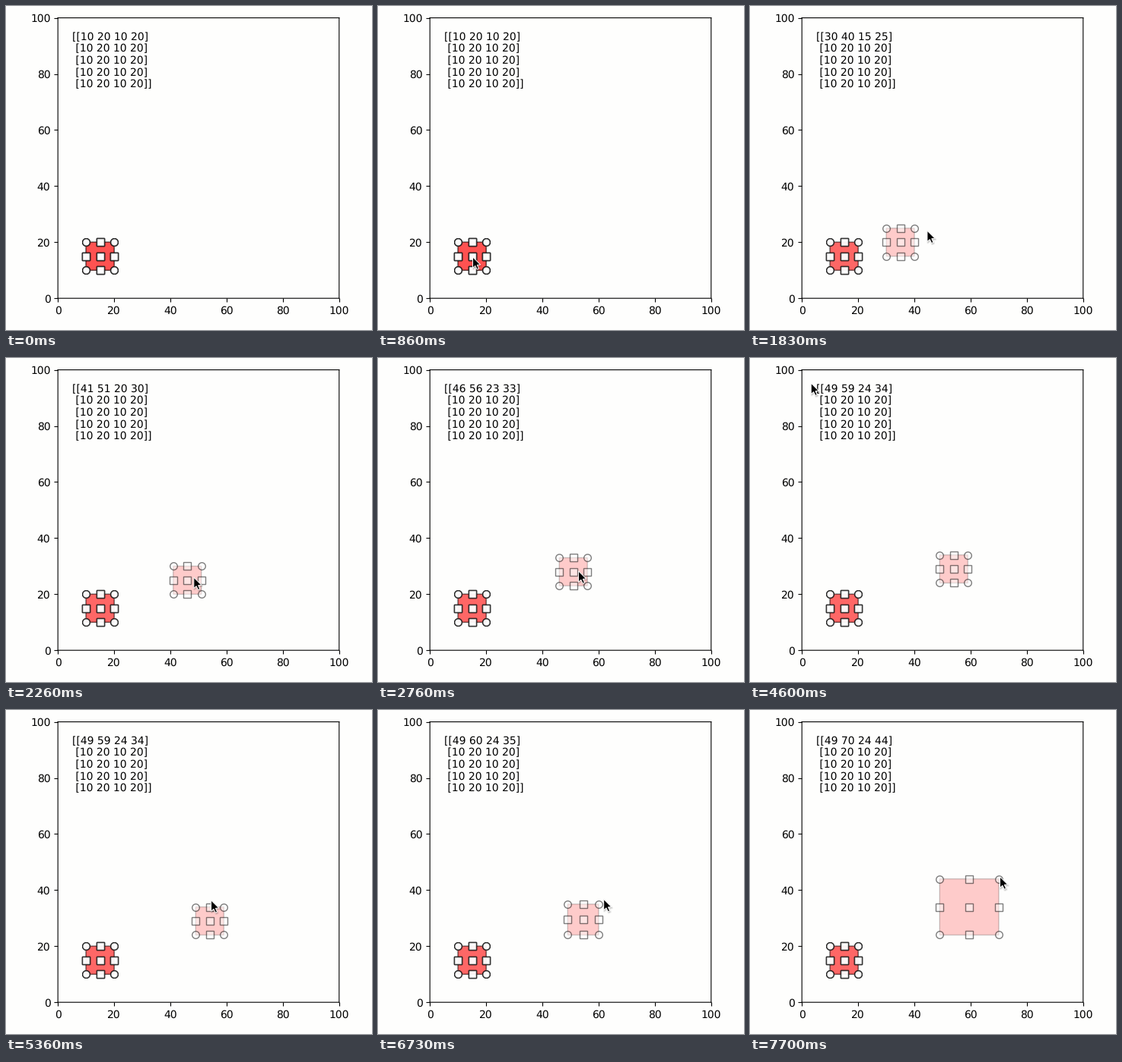
Animation of 481x427 px, one loop 8000 ms. Source, as a matplotlib script:

```python
import numpy as np
import matplotlib.pyplot as plt
from matplotlib.animation import FuncAnimation
from matplotlib.patches import Polygon, Rectangle

W, H, DPI = 481, 427, 100
INTERVAL, LOOP = 25, 8000
LEFT, TOP, SIDE = 68.2, 15.6, 369.6
UNIT = SIDE / 100  # pixels per data unit
PAPER = "#fefefd"

plt.rcParams.update({"font.family": "DejaVu Sans", "font.size": 10,
                     "text.hinting": "none", "path.snap": False})


def linear(s):
    return s


def smooth(s):
    return s * s * (3 - 2 * s)


def brake(s):
    return 1 - (1 - s) ** 2


def soft(s):
    return 1 - (1 - s) ** 1.3


# Pointer strokes: begin, end (ms), easing, bend point, stop (pixels)
ENTRY = (484, 179)
STROKES = [
    (0, 830, brake, (220, 280), (124, 330)),
    (1260, 1850, smooth, (178, 325), (233, 295)),
    (1850, 2900, linear, None, (268, 277.5)),
    (3440, 3900, smooth, None, (160, 21)),
    (3900, 4260, smooth, None, (84, 27)),
    (4300, 5100, smooth, (45, 15), (210, 132)),
    (5130, 5500, smooth, (260, 276), (298, 258)),
    (5500, 5760, smooth, None, (287, 257)),
    (6550, 7540, soft, None, (328, 219)),
]


def pointer(t):
    """Tip of the pointer, moving along quadratic curves."""
    pos = np.array(ENTRY, float)
    for begin, end, ease, bend, stop in STROKES:
        if t <= begin:
            break
        stop = np.array(stop, float)
        bend = (pos + stop) / 2 if bend is None else np.array(bend)
        u = ease(min((t - begin) / (end - begin), 1))
        pos = (1 - u) ** 2 * pos + 2 * u * (1 - u) * bend + u * u * stop
    return pos


def pull(t, begin, end, lag):
    """Whole data units the pointer has dragged, seen with a delay."""
    dx, dy = pointer(np.clip(t - lag, begin, end)) - pointer(begin)
    return round(dx / UNIT), round(-dy / UNIT)


class Selector:
    """Translucent rectangle with corner, edge and centre handles."""

    def __init__(self, ax):
        self.rect = ax.add_patch(Rectangle((0, 0), 1, 1, facecolor="red",
                                           edgecolor="black", alpha=0.2))
        self.handles = [
            ax.plot([], [], marker=m, ls="none", mfc="w", mec="black",
                    ms=6.9, mew=1, alpha=0.5)[0] for m in "oss"]

    def place(self, x0, x1, y0, y1):
        self.rect.set_bounds(x0, y0, x1 - x0, y1 - y0)
        xm, ym = (x0 + x1) / 2, (y0 + y1) / 2
        corners, edges, centre = self.handles
        corners.set_data([x0, x1, x1, x0], [y0, y0, y1, y1])
        edges.set_data([x0, xm, x1, xm], [ym, y0, ym, y1])
        centre.set_data([xm], [ym])


# The tiny surplus keeps the pixel size from being rounded down
fig = plt.figure(figsize=((W + 1e-6) / DPI, (H + 1e-6) / DPI), dpi=DPI,
                 facecolor=PAPER)
ax = fig.add_axes([LEFT / W, 1 - (TOP + SIDE) / H, SIDE / W, SIDE / H],
                  facecolor=PAPER)
HOME = (10, 20, 10, 20)
selectors = [Selector(ax) for _ in range(5)]
for sel in selectors:
    sel.place(*HOME)
moving = selectors[-1]
label = ax.text(5, 95, "", va="top")
ax.set(xlim=(0, 100), ylim=(0, 100))

# Pixel layer for the pointer
top = fig.add_axes([0, 0, 1, 1])
top.set(xlim=(0, W), ylim=(H, 0))
top.axis("off")
ARROW = np.array([(0, 0), (0, 14.5), (3.3, 11.5), (5.7, 16.4), (8, 15.4),
                  (5.8, 10.5), (10.2, 10.2)]) + (0.5, 0.8)
shadows = [top.add_patch(Polygon(ARROW, fc="black", ec="black", lw=lw,
                                 alpha=0.07, joinstyle="round"))
           for lw in (0.5, 2)]
arrow = top.add_patch(Polygon(ARROW, fc="black", ec="white", lw=0.7))


def update(i):
    t = i * INTERVAL
    dx, dy = pull(t, 1260, 2950, lag=200)
    gx, gy = pull(t, 6550, LOOP, lag=130)
    box = (10 + dx, 20 + dx + gx, 10 + dy, 20 + dy + gy)
    moving.place(*box)
    rows = [" ".join(map(str, row)) for row in [box] + [HOME] * 4]
    label.set_text("[" + "\n ".join(f"[{row}]" for row in rows) + "]")
    tip = pointer(t)
    arrow.set_xy(ARROW + tip)
    for shadow in shadows:
        shadow.set_xy(ARROW + tip + (0.8, 1.5))


anim = FuncAnimation(fig, update, frames=LOOP // INTERVAL, interval=INTERVAL,
                     repeat=True, repeat_delay=0)
plt.show()
```
